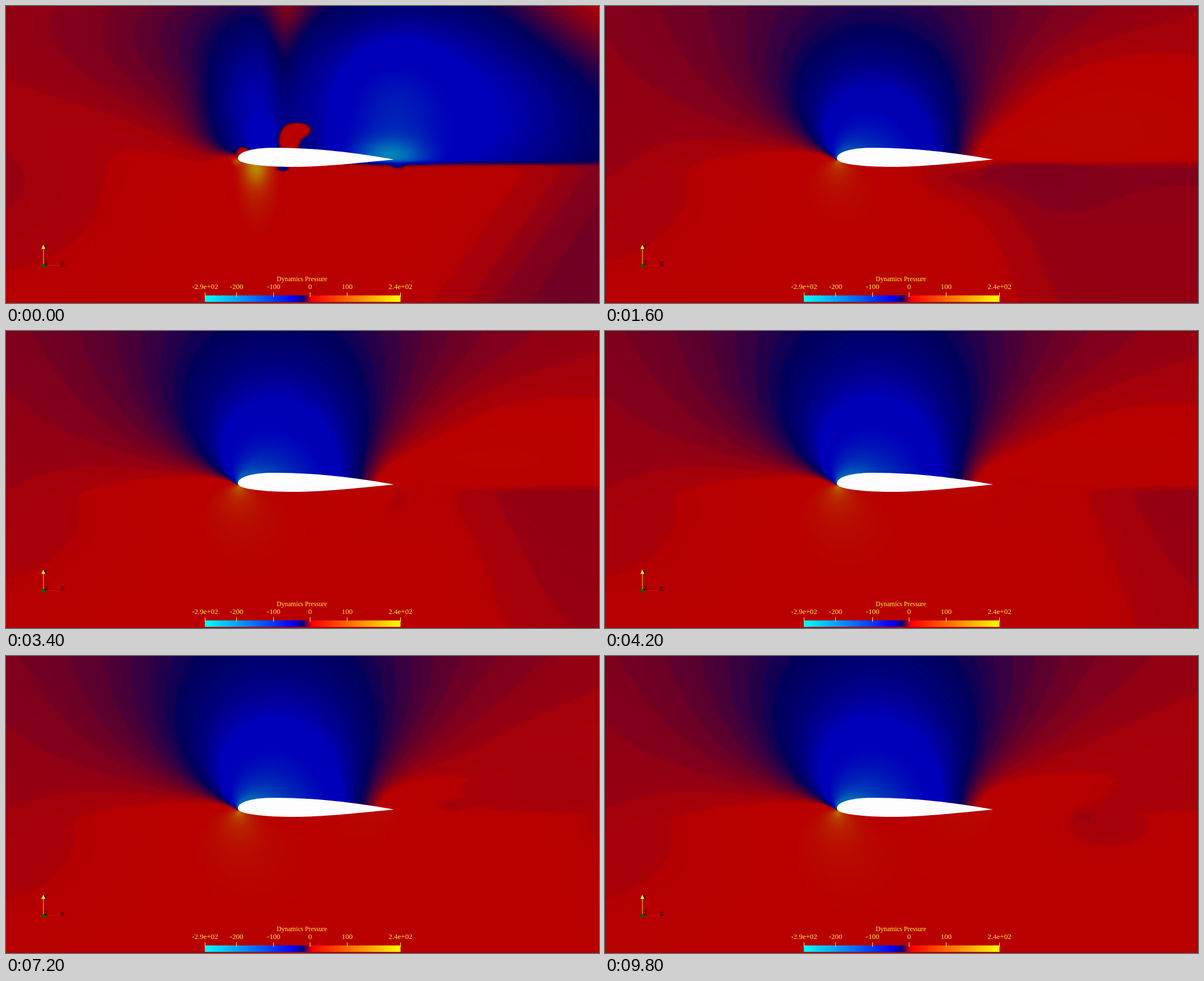
An HTML page with a canvas that plays this animation: 1056x530 px, repeating every 10 s.

```html
<!DOCTYPE html>
<html lang="en">
<head>
<meta charset="utf-8">
<title>Pressure around an airfoil</title>
<style>
  html, body { margin: 0; width: 100%; height: 100%; overflow: hidden; background: #b40000; }
  canvas, svg { position: absolute; left: 0; top: 0; width: 1056px; height: 530px; }
  .legend { font-family: "Liberation Serif", serif; font-size: 13px; fill: #fff03c; text-anchor: middle; }
  .legend .title { font-size: 11.7px; }
  .axes { font-family: "Liberation Sans", sans-serif; font-size: 11px; fill: #000; }
</style>
</head>
<body>
<canvas id="view" width="1056" height="530"></canvas>
<svg viewBox="0 0 1056 530">
  <defs>
    <linearGradient id="bar">
      <stop offset="0" stop-color="#0ff"/>
      <stop offset=".45" stop-color="#00f"/>
      <stop offset=".5" stop-color="#000080"/>
      <stop offset=".55" stop-color="#f00"/>
      <stop offset="1" stop-color="#ff0"/>
    </linearGradient>
  </defs>
  <path fill="#fdfdfe" d="M413 272C413 262 432 253.5 475 253C548 252.5 630 262.5 691 274C620 281 560 287 512 287C465 287 413 283 413 272Z"/>
  <g class="axes">
    <path d="M66.5 463.5H97" stroke="#d01800"/>
    <path d="M66.5 463V432" stroke="#e6c800"/>
    <path d="M66.5 426L70 433.5H63Z" fill="#ffff20"/>
    <rect x="63.5" y="460.5" width="6" height="6" fill="#006400"/>
    <text x="67" y="434">Y</text>
    <text x="68.5" y="463">Z</text>
    <text x="97" y="464">X</text>
  </g>
  <rect x="354" y="516.5" width="348.5" height="11.5" fill="url(#bar)"/>
  <g class="legend" id="legend">
    <text class="title" x="527" y="491">Dynamics Pressure</text>
  </g>
</svg>
<script>
const W = 528, H = 265, STEP = 200, STEPS = 50;
const view = document.getElementById('view').getContext('2d');
const grid = document.createElement('canvas');
grid.width = W;
grid.height = H;
const gridCtx = grid.getContext('2d');
const image = gridCtx.createImageData(W, H);

const { exp, hypot, sqrt, sin, cos, min, max, abs } = Math;
const clamp = (v, a, b) => min(b, max(a, v));
const mix = (a, b, t) => a + (b - a) * t;
const sig = v => 1 / (1 + exp(-v));
const bump = (x, y, cx, cy, rx, ry) => exp(-(((x - cx) / rx) ** 2) - ((y - cy) / ry) ** 2);

// Levels: 1 is red, 0 navy, -1 blue; beyond lie yellow and cyan.
// Pure red and pure blue each cover a wide plateau.
const plateau = s => abs(s) > 1 ? Math.sign(s) * (1 + max(0, abs(s) - 1.9) * 0.8) : s;

// Complex helpers on [re, im]
const mul = (a, b) => [a[0] * b[0] - a[1] * b[1], a[0] * b[1] + a[1] * b[0]];
const inv = a => { const n = a[0] ** 2 + a[1] ** 2 + 1e-9; return [a[0] / n, -a[1] / n]; };
const root = (re, im) => {
  const r = hypot(re, im);
  return [sqrt(max(0, (r + re) / 2)), (im < 0 ? -1 : 1) * sqrt(max(0, (r - re) / 2))];
};

// Pressure coefficient of a Joukowski airfoil in units of b
const B = 69, CX = 553, CY = 274, ALPHA = 0.093, MX = -0.09, MY = 0.022;
const R = hypot(1 - MX, MY), LIFT = 2 * R * sin(ALPHA + Math.asin(MY / R));

function pressure(x, y) {
  const zx = (x - CX) / B, zy = (CY - y) / B;
  const q = mul(root(zx - 2, zy), root(zx + 2, zy));
  let d = [(zx + q[0]) / 2 - MX, (zy + q[1]) / 2 - MY];
  const r = hypot(d[0], d[1]);
  if (r < R) d = [d[0] * R / r, d[1] * R / r];
  const i1 = inv(d), i2 = mul(i1, i1);
  const turn = mul([cos(ALPHA), sin(ALPHA)], i2);
  const u = cos(ALPHA) - R * R * turn[0] - LIFT * i1[1];
  const v = -sin(ALPHA) - R * R * turn[1] + LIFT * i1[0];
  const zeta = inv([d[0] + MX, d[1] + MY]), z2 = mul(zeta, zeta);
  const scale = (1 - z2[0]) ** 2 + z2[1] ** 2;
  return clamp(1 - (u * u + v * v) / (scale + 1e-4), -1.1, 1);
}

// Field right after the impulsive start
function impulse(x, y) {
  const back = max(0, 413 - x);
  const wake = x < 413 ? 270 - back * 0.25 : 272 + min(7, (x - 413) / 40) + max(0, x - 700) / 120;
  const below = sig((y - wake) / (x < 413 ? 3 + back * 0.12 : 2));

  let up = 0.95
    - 1.15 * bump(x, y, 440, 205, 80, 135)
    - 0.5 * bump(x, y, 390, 50, 220, 150)
    - 0.15 * bump(x, y, 0, 40, 280, 180)
    - 2.2 * bump(x, y, 760, 190, x < 760 ? 270 : 340, 230)
    + 0.5 * bump(x, y, 1056, 0, 170, 130)
    + 0.5 * bump(x, y, 495, 110, 28, 120)
    + 0.4 * bump(x, y, 507, 0, 45, 60)
    - 7 * bump(x, y, 682, 270, 62, 32)
    - 2.8 * bump(x, y, 692, 215, 85, 110)
    - 0.9 * bump(x, y, 458, 235, 25, 25);
  const hot = bump(x, y, 504, 242, 22, 26) + bump(x, y, 523, 221, 23, 13) + bump(x, y, 422, 262, 13, 12);
  up = mix(up, 1, clamp(hot * 3 - 0.9, 0, 1));

  let low = 1
    + 7 * bump(x, y, 445, 284, 22, 34)
    + 2.6 * bump(x, y, 448, 310, 42, 100)
    + 5 * bump(x, y, 411, 276, 8, 7)
    - 0.4 * sig((x + 0.7 * (y - 280) - 1020) / 45);
  const cold = bump(x, y, 492, 290, 14, 6) + bump(x, y, 698, 283, 12, 7);
  low = mix(low, -0.3, clamp(cold * 2 - 0.5, 0, 1));
  return plateau(mix(up, low, below));
}

const cp = new Float32Array(W * H), start = new Float32Array(W * H), inlet = new Float32Array(W * H);
for (let j = 0, n = 0; j < H; j++) {
  for (let i = 0; i < W; i++, n++) {
    const x = i * 2 + 1, y = j * 2 + 1;
    cp[n] = pressure(x, y);
    start[n] = impulse(x, y);
    inlet[n] = bump(x, y, -40, 320, 190, 140);
  }
}

// Wake left behind by the starting vortex
function wakeField(k) {
  const edge = 385 + 110 * sqrt(k), shade = 0.32 * exp(-k / 40);
  const lobe = 0.5 * exp(-k / 14), near = 0.2 * exp((4 - k) / 5), rear = 0.35 * exp(-k / 12);
  const lift = 0.3 * exp((4 - k) / 7);
  const late = clamp((k - 24) / 10, 0, 1), end = clamp((k - 36) / 13, 0, 1);
  const trail = 0.16 * late * (1 - 0.35 * end), trailX = 960 + 70 * end;
  const core = 708 + k * 0.9 + 0.042 * k * k, coreY = 267 + 20 * end;
  return (x, y) => {
    const below = sig((y - 279) / 3);
    let s = (1 - below) * (lobe * bump(x, y, 880, 195, 220, 120) + lift * bump(x, y, 480, 40, 220, 150));
    if (below > 0.01) {
      s -= below * (shade * sig((x - edge - 0.3 * (y - 278)) / 32) * exp((278 - y) / 900)
        + near * bump(x, y, 750, 312, 110, 60)
        + rear * bump(x, y, 645, 294, 70, 38));
    }
    if (trail) s -= trail * (1 - below) * bump(x, y, trailX, 235, 180, 65);
    if (end) s -= 0.12 * end * bump(x, y, core + 45, 305, 75, 35);
    return s - 0.12 * bump(x, y, core, coreY, 18, 8);
  };
}

function paint(data, o, s) {
  if (s > 0 && s < 1) s = mix(s, Math.round(s * 10) / 10, 0.6);
  data[o] = 184 * clamp(s, 0, 1);
  data[o + 1] = 184 * clamp((abs(s) - 1) / 9, 0, 1);
  data[o + 2] = s > 0 ? 92 * max(0, 1 - s) : 92 * (1 + min(1, -s));
  data[o + 3] = 255;
}

function draw(k) {
  const gain = 215 * (1 - 0.47 * exp(-k / 9)), first = exp(-1.1 * k), wake = wakeField(k);
  const dim = 0.1 + 0.07 * exp(-k / 10);
  for (let j = 0, n = 0; j < H; j++) {
    for (let i = 0; i < W; i++, n++) {
      const s = k ? plateau((gain * cp[n] + 25) / 26.5) + wake(i * 2 + 1, j * 2 + 1) : 0;
      paint(image.data, n * 4, mix(s, start[n], first) - dim * inlet[n]);
    }
  }
  gridCtx.putImageData(image, 0, 0);
  view.drawImage(grid, 0, 0, 1056, 530);
}

const marks = [[354.5, '-2.9e+02'], [410.5, '-200'], [476.5, '-100'], [541.5, '0'], [607.5, '100'], [702.5, '2.4e+02']];
document.getElementById('legend').innerHTML += marks.map(([x, label]) =>
  `<text x="${x}" y="505">${label}</text><path d="M${x} 511V519" stroke="#fff03c"/>`).join('');

let shown = -1;
const begin = performance.now();
function tick() {
  const k = Math.floor((performance.now() - begin) / STEP) % STEPS;
  if (k !== shown) draw(shown = k);
  requestAnimationFrame(tick);
}
tick();
</script>
</body>
</html>
```
